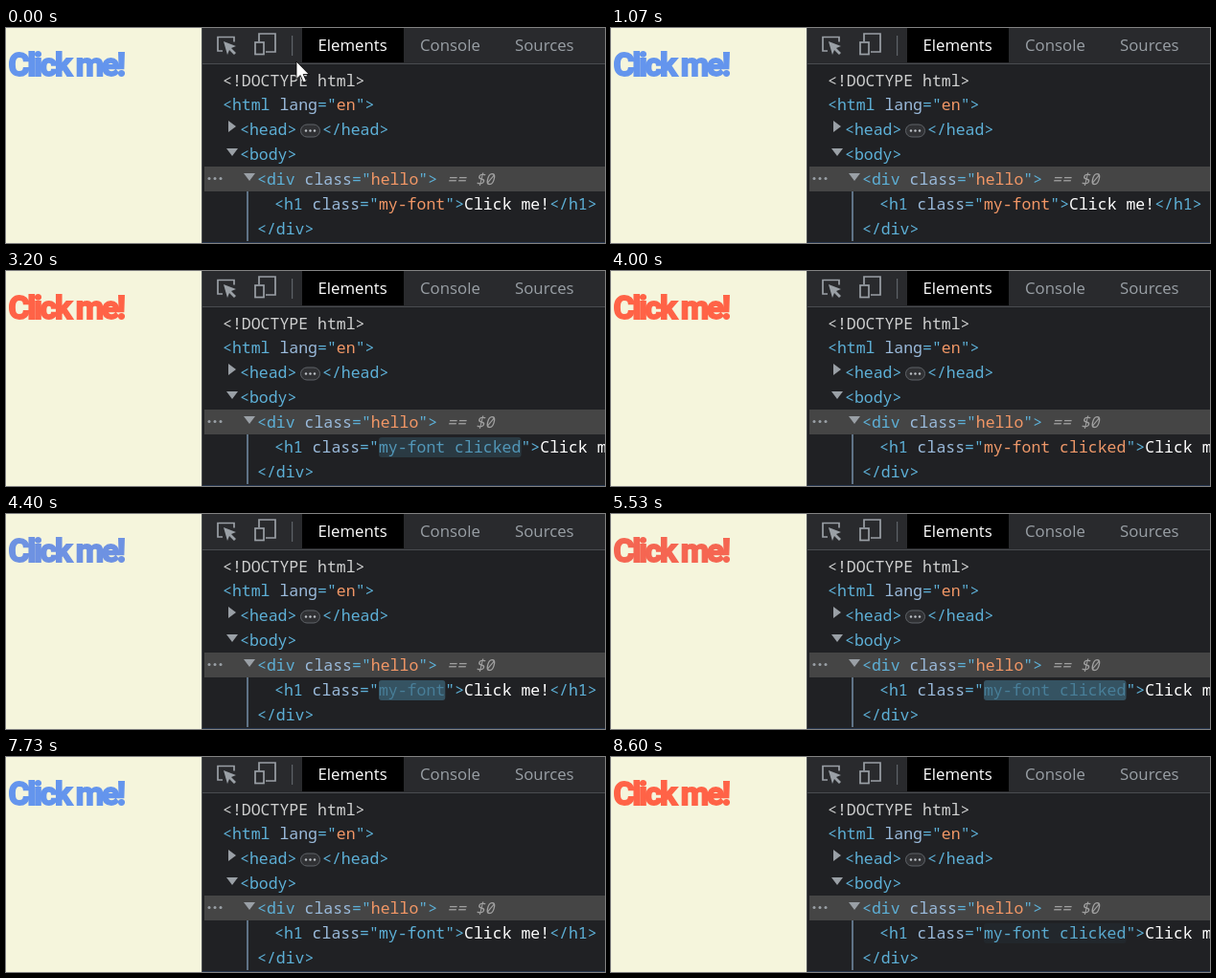
These frames come from a looping animation (625x225 px, 8.67 s). An HTML page:

```html
<!DOCTYPE html>
<html lang="en">
<head>
<meta charset="utf-8">
<title>Toggle a class on click</title>
<style>
  html, body { margin: 0; width: 100%; height: 100%; overflow: hidden; background: #202124; }
  svg { display: block; width: 625px; height: 225px; }

  .code { font: 500 16.5px "Noto Sans Mono", "DejaVu Sans Mono", monospace; fill: #5db0d7; }
  .code text { white-space: pre; }
  .attr { fill: #9bbbdc; }
  .value { fill: #f29766; }
  .plain { fill: #fff; }
  .doctype { fill: #cfd0d0; }
  .ref { fill: #a0a0a0; font-style: italic; }
  .tabs { font: 16.8px "Open Sans", "Noto Sans", sans-serif; fill: #9aa0a6; }
  .icon { fill: none; stroke: #9aa0a6; stroke-width: 1.7; }
  .grey { fill: #9aa0a6; }

  #title {
    font: 700 34px Roboto, "Liberation Sans", sans-serif;
    letter-spacing: -2.4px;
    fill: #6495ed;
    stroke-width: 1.8px;
    stroke: #6495ed;
  }
  #flash { fill: #5db0d7; opacity: 0; }

  /* Paused animations, moved along by the time since the last click */
  .touched #title, .touched #flash, .touched #names {
    animation: 1.4s cubic-bezier(0, 0, .2, 1) var(--age) both paused;
  }
  .touched #title { animation-duration: .5s; animation-timing-function: ease; }
  .touched.red #title { animation-name: redden; }
  .touched.blue #title { animation-name: cool; }
  .touched #flash { animation-name: flash; }
  .touched #names { animation-name: ink; }

  @keyframes redden {
    from { fill: #6495ed; stroke: #6495ed; }
    to { fill: #ff6347; stroke: #ff6347; }
  }
  @keyframes cool {
    from { fill: #ff6347; stroke: #ff6347; }
    to { fill: #6495ed; stroke: #6495ed; }
  }
  @keyframes flash {
    from { opacity: 1; }
    80%, to { opacity: 0; }
  }
  @keyframes ink {
    from { fill: #202124; }
    80% { fill: #5db0d7; }
    to { fill: #f29766; }
  }
</style>
</head>
<body>
<svg id="stage" viewBox="0 0 625 225">
  <rect width="204" height="225" fill="#f5f5dc"/>
  <text id="title" x="2.500" y="50">Click me!</text>

  <rect x="204" width="421" height="225" fill="#202124"/>
  <rect x="204" width="421" height="37" fill="#292a2d"/>
  <rect x="204" y="37" width="421" height="1" fill="#494c50"/>
  <rect x="204" width="1" height="225" fill="#494c50"/>
  <rect x="309" width="106" height="36" fill="#000"/>
  <rect x="298" y="8" width="1.200" height="21" fill="#5f6368"/>

  <g class="icon">
    <path d="M226 24h-5V9.500h17v5"/>
    <path d="M264 14V6h17v19h-10"/>
    <rect x="260" y="15" width="9" height="12.500"/>
  </g>
  <path class="grey" d="M227 14l13 5-5 2 5 5-2 2-5-5-2 5z"/>

  <g class="tabs">
    <text x="325.500" y="24" fill="#fff">Elements</text>
    <text x="432" y="24">Console</text>
    <text x="531" y="24">Sources</text>
  </g>

  <rect x="207" y="145" width="418" height="26" fill="#454545"/>
  <rect x="251" y="171" width="2" height="52" fill="#5f7286"/>
  <rect x="205" y="224" width="420" height="1" fill="#26364e"/>

  <g class="grey">
    <path d="M232 97v12l8-6z"/>
    <path d="M230 126h12l-6 8z"/>
    <path d="M248 152h12l-6 8z"/>
    <circle cx="212" cy="157.500" r="1.500"/>
    <circle cx="218" cy="157.500" r="1.500"/>
    <circle cx="224" cy="157.500" r="1.500"/>
  </g>
  <rect x="307.500" y="101" width="20" height="13" rx="6.500" fill="#303134" stroke="#5f6368"/>
  <g fill="#bdc1c6">
    <circle cx="313" cy="107.500" r="1.200"/>
    <circle cx="317.500" cy="107.500" r="1.200"/>
    <circle cx="322" cy="107.500" r="1.200"/>
  </g>

  <rect id="flash" x="389" y="174" height="21" rx="3"/>

  <g class="code">
    <text x="226" y="61" class="doctype">&lt;!DOCTYPE html&gt;</text>
    <text x="226" y="86">&lt;html <tspan class="attr">lang</tspan>="<tspan class="value">en</tspan>"&gt;</text>
    <text x="244" y="112">&lt;head&gt;</text>
    <text x="330" y="112">&lt;/head&gt;</text>
    <text x="244" y="138">&lt;body&gt;</text>
    <text x="262" y="164">&lt;div <tspan class="attr">class</tspan>="<tspan class="value">hello</tspan>"&gt;<tspan class="ref"> == $0</tspan></text>
    <text x="280" y="190">&lt;h1 <tspan class="attr">class</tspan>="<tspan class="value" id="names">my-font</tspan>"&gt;<tspan class="plain">Click me!</tspan>&lt;/h1&gt;</text>
    <text x="262" y="216">&lt;/div&gt;</text>
  </g>

  <path id="pointer" d="M0 0v18.500l4.200-4 3.200 7.500 3-1.300-3.200-7.200h6z" fill="#fff" stroke="#000" stroke-width=".8"/>
</svg>

<script>
  const LOOP = 8670;
  const CLICKS = [2660, 4060, 5190, 6660, 7790];
  const CHAR = 9.9;
  const [stage, names, flash, pointer] =
    ["stage", "names", "flash", "pointer"].map(id => document.getElementById(id));
  let shown = -1;

  function showState(count) {
    const red = count % 2 === 1;
    const label = red ? "my-font clicked" : "my-font";
    names.textContent = label;
    flash.setAttribute("width", label.length * CHAR);
    stage.setAttribute("class", count ? `touched ${red ? "red" : "blue"}` : "");
    shown = count;
  }

  // The pointer slides out past the left edge and stays away
  function movePointer(t) {
    const p = Math.min(Math.max((t - 630) / 410, 0), 1);
    const ease = p * p * (3 - 2 * p);
    pointer.setAttribute("transform", `translate(${303 - 318 * ease} ${35 + 86 * ease})`);
    pointer.setAttribute("visibility", p < 1 ? "visible" : "hidden");
  }

  function draw() {
    const t = performance.now() % LOOP;
    const count = CLICKS.filter(c => c <= t).length;
    if (count !== shown) showState(count);
    if (count) stage.style.setProperty("--age", `${CLICKS[count - 1] - t}ms`);
    movePointer(t < 670 ? 0 : t);
    requestAnimationFrame(draw);
  }
  draw();
</script>
</body>
</html>
```
